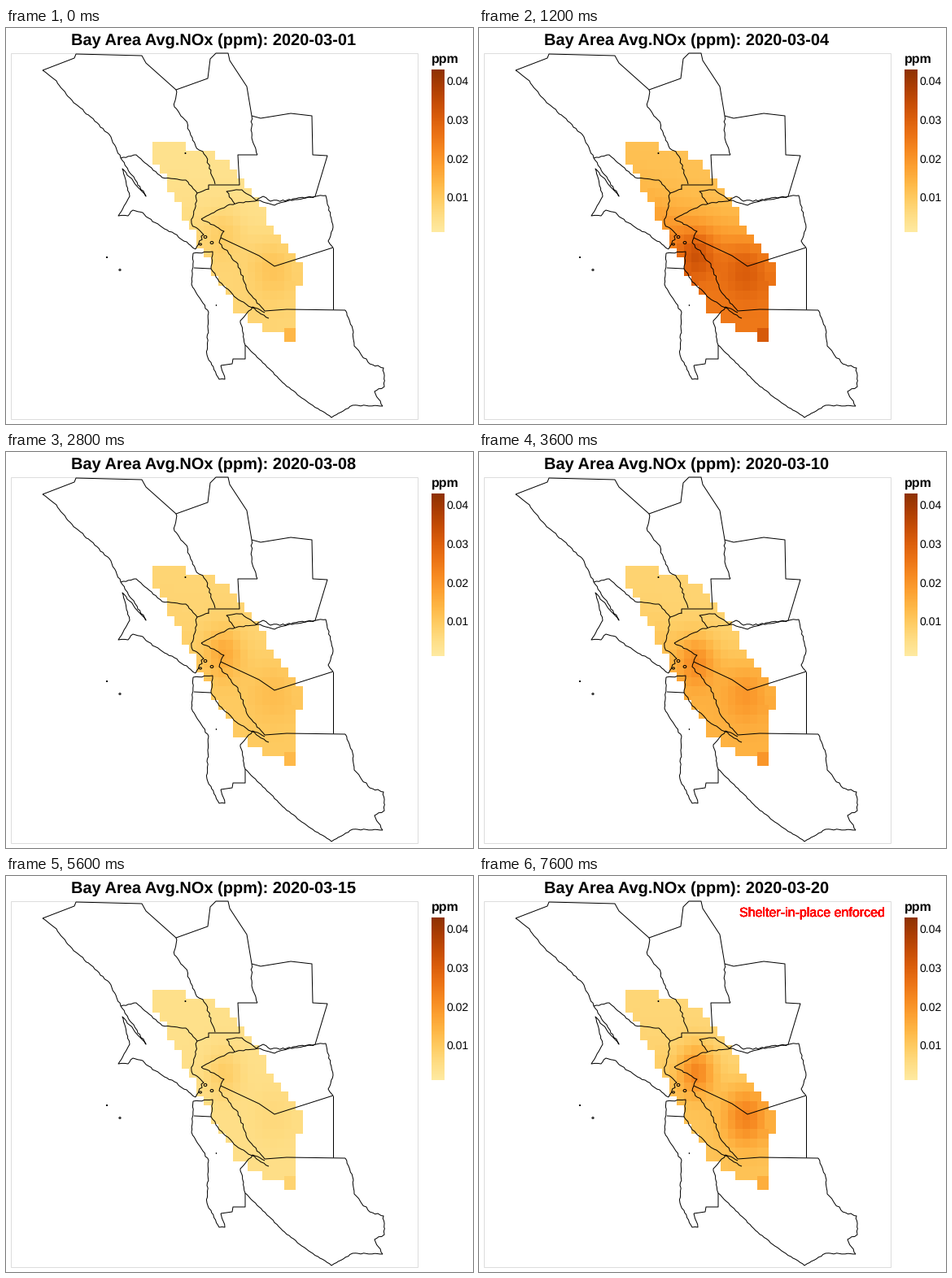
Write a matplotlib script that moves like this. It is 574 by 487 pixels and loops after 8 s.

```python
import numpy as np
import matplotlib.pyplot as plt
from matplotlib.animation import FuncAnimation
from matplotlib.collections import LineCollection, PolyCollection
from matplotlib.colors import LinearSegmentedColormap
from matplotlib.patches import Rectangle

WIDTH, HEIGHT, DPI = 574, 487, 100
DAYS, INTERVAL = 20, 400
SHELTER_DAY = 17

plt.rcParams["font.family"] = "Liberation Sans"
plt.rcParams["text.hinting"] = "none"

cmap = LinearSegmentedColormap.from_list("heat", [
    "#feeaa1", "#fedd84", "#fecc63", "#feb746", "#fca031", "#f68921",
    "#eb7215", "#db5e0b", "#c54c05", "#ab3d03", "#8f3204"])

fig = plt.figure(figsize=(WIDTH / DPI, HEIGHT / DPI), dpi=DPI, facecolor="white")
ax = fig.add_axes([0, 0, 1, 1])
ax.axis("off")


def px(size):
    return size * 72 / DPI


def label(x, y, text, size, **style):
    return ax.text(x, y, text, fontsize=px(size), va="baseline", **style)


# Diagonal band of overlapping cells
ROWS, CELL_W, CELL_H = 21, 14, 17


def first_col(row):
    return int(0.69 * row) if row < 18 else (13, 15, 18)[row - 18]


def last_col(row):
    if row < 3:
        return (3, 7, 9)[row]
    return min(row + 7 - (row > 7), 19) if row < 15 else 18


cells = np.array([(179.5 + 9.05 * col, 139.5 + 11.45 * row)
                  for row in range(ROWS)
                  for col in range(first_col(row), last_col(row) + 1)])
corners = np.array([(0, 0), (CELL_W, 0), (CELL_W, CELL_H), (0, CELL_H)])
heat = PolyCollection(cells[:, None, :] + corners, edgecolors="none",
                      linewidths=0, zorder=1)
ax.add_collection(heat)
cx, cy = cells[:, 0] + 5, cells[:, 1] + 6

# day: north level, south level, west peak, west peak y, east peak, corner boost
KEYS = {
    1: (.07, .15, .08, 250, .10, .15),
    4: (.25, .57, .24, 278, .18, .15),
    8: (.15, .21, .18, 247, .07, .08),
    12: (.16, .43, .28, 266, .22, .17),
    15: (.08, .09, .11, 243, .04, .07),
    17: (.14, .28, .24, 253, .26, .13),
    20: (.14, .24, .33, 240, .31, .10),
}


def bump(x, y, rx, ry):
    return np.exp(-((cx - x) / rx) ** 2 - ((cy - y) / ry) ** 2)


def field(day):
    north, south, west, west_y, east, corner = (
        np.interp(day, list(KEYS), values) for values in zip(*KEYS.values()))
    slope = (cy - 0.3 * (cx - 268) - 245) / 18
    level = north + (south - north) / (1 + np.exp(-slope))
    level = level + west * bump(268, west_y, 22, 30) + east * bump(330, 295, 28, 36)
    level[-1] += corner
    return level


# County lines; a positive amount adds the small bends of shores and ridges
rng = np.random.default_rng(4)
lines = []


def border(*points, amount=0.0, step=3.5):
    path = [np.array(points[0], float)]
    for a, b in zip(np.array(points[:-1], float), np.array(points[1:], float)):
        n = max(1, round(np.hypot(*(b - a)) / step))
        for i in range(1, n + 1):
            bend = rng.uniform(-amount, amount, 2) if i < n else 0
            path.append(a + (b - a) * i / n + bend)
    lines.append(np.array(path))


def islet(x, y, r):
    angle = np.linspace(0, 2 * np.pi, 9)
    lines.append(np.column_stack([x + r * np.cos(angle), y + 0.8 * r * np.sin(angle)]))


# North
border((45, 52), (84, 37), (86, 32), (167, 34), (172, 43), (209, 76),
       (248, 62), (251, 38), (258, 31), (273, 31), (275, 40), (296, 72), (302, 108))
border((302, 108), (313, 111), (350, 105), (376, 108), (377, 156), (395, 157),
       (380, 207))
border((249, 199), (249, 193), (287, 193), (285, 156), (309, 156))
border((45, 52), (62, 65), (76, 84), (127, 131), (141, 160), amount=0.7)
border((141, 160), (160, 156), (192, 184), (221, 187), (235, 203), (249, 198),
       amount=0.6)
border((209, 76), (207, 97), (220, 113), (233, 145), (246, 158), (257, 192),
       amount=1.2)
border((302, 108), (302, 135), (309, 156), amount=0.9)

# West coast and bay
border((141, 160), (172, 207), (143, 173), (152, 207), (138, 231), (150, 231),
       (156, 224), (168, 227), (180, 238), (207, 253), (233, 272), amount=0.8)
border((233, 272), (243, 254), (228, 240), (235, 203), amount=1.5)
border((230, 277), (254, 275), (252, 296), (262, 312), (283, 332), (323, 357),
       amount=0.8)
border((230, 277), (228, 315), (249, 350), (247, 402), (262, 432), (269, 432),
       (264, 415), amount=0.8)
border((231, 295), (252, 296))
border((264, 415), (278, 413), (279, 407), (294, 407), (294, 390))

# East
border((380, 207), (358, 211), (325, 213), (316, 207), (308, 212), (290, 199),
       (271, 201), (281, 216), amount=1)
border((240, 235), (275, 217), (312, 212), (330, 218), (353, 210), (393, 206),
       (402, 245), (396, 262), (402, 270), amount=0.9)
border((264, 258), (268, 250), (240, 235), amount=1.2)
border((402, 270), (330, 293), (311, 280), (264, 258))
border((402, 270), (402, 346))
border((264, 258), (262, 264), (285, 290), (298, 325), (318, 348), amount=1)
border((318, 348), (345, 346), (417, 347))

# South
border((294, 390), (288, 360), (303, 343), (318, 350), amount=0.8)
border((417, 347), (427, 374), (428, 391), (447, 413), (464, 418), (465, 441),
       (453, 447), (463, 465), amount=1)
border((463, 465), (426, 464), (400, 479), (372, 461), (340, 436), (294, 390),
       amount=0.6)

islet(245, 257, 2)
islet(239, 266, 1.5)
islet(253, 264, 2)
islet(140, 297.5, 1.2)
islet(124, 282, 0.7)
islet(220.5, 154, 0.6)
islet(258.5, 341, 0.4)

ax.add_collection(LineCollection(lines, colors="black", linewidths=px(1), zorder=3))
ax.add_patch(Rectangle((5.5, 30.5), 500, 450, fill=False, ec="#dddddd",
                       lw=px(1), zorder=2))

# Legend
ax.imshow(np.linspace(1, 0, 200)[:, None], cmap=cmap, vmin=0, vmax=1,
          extent=(523, 539, 251, 51), aspect="auto", interpolation="nearest")
ax.set_xlim(0, WIDTH)
ax.set_ylim(HEIGHT, 0)
label(523, 43, "ppm", 16, weight="bold")
for i in range(1, 5):
    label(541, 261 - 47.7 * i, f"0.0{i}", 14)

title = label(255, 21, "", 20, weight="bold", ha="center")
# Stacked copies give the heavy, hard-edged lettering
notes = [label(320, 50, "Shelter-in-place enforced", 16, color="red", zorder=5)
         for _ in range(8)]


def update(frame):
    day = frame + 1
    title.set_text(f"Bay Area Avg.NOx (ppm): 2020-03-{day:02d}")
    heat.set_facecolor(cmap(np.clip(field(day), 0, 1)))
    for note in notes:
        note.set_visible(day >= SHELTER_DAY)
    return [title, heat, *notes]


anim = FuncAnimation(fig, update, frames=DAYS, interval=INTERVAL,
                     repeat=True, repeat_delay=0, blit=False)
plt.show()
```
